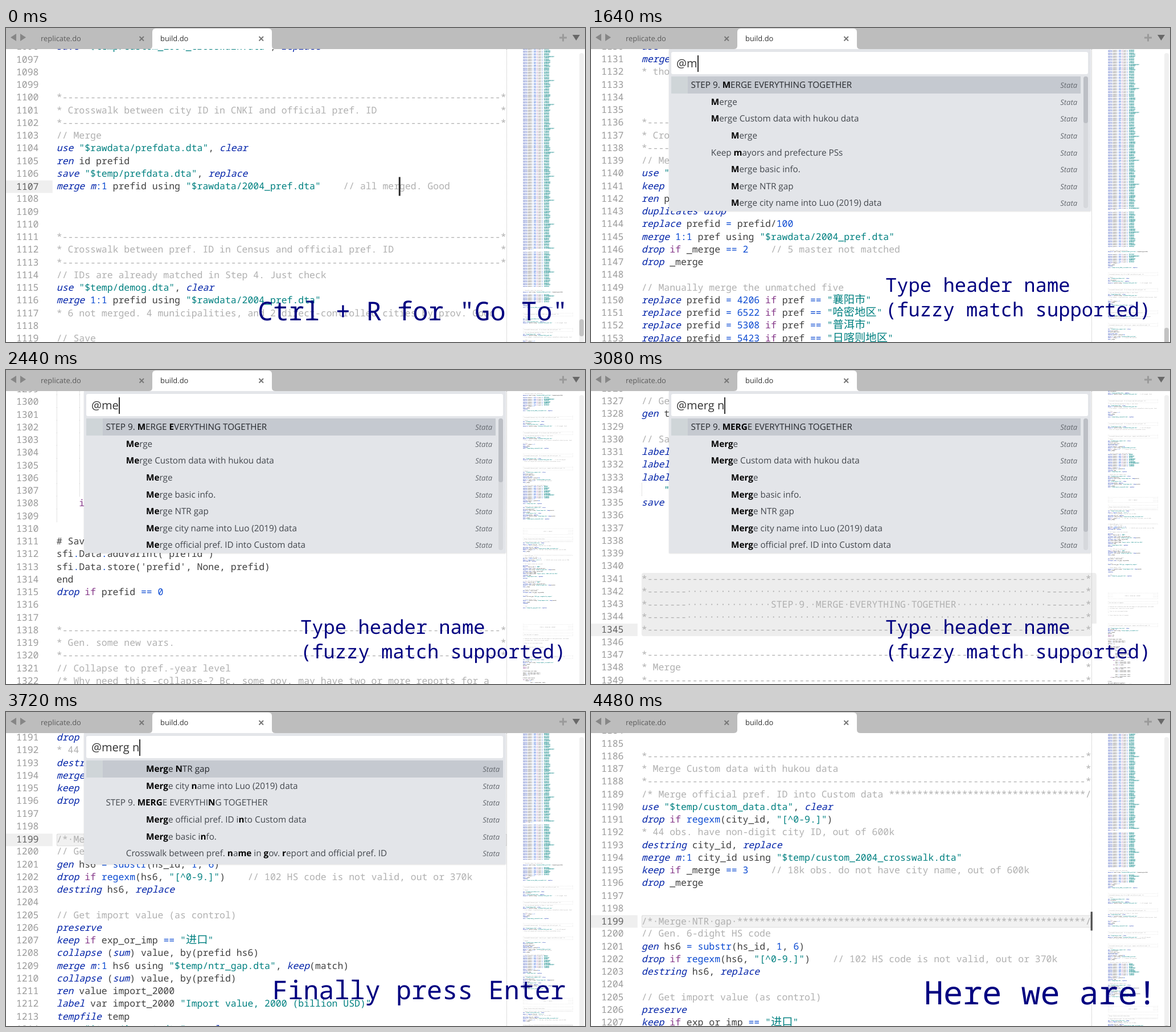
Write an HTML page that moves like this. It is 1017 px wide and 551 px high and loops after 4.96 s.

```html
<!DOCTYPE html>
<html lang="en">
<head>
<meta charset="utf-8">
<title>Go to header</title>
<style>
  html, body { margin: 0; width: 100%; height: 100%; overflow: hidden; background: #fff; }
  body { position: relative; text-rendering: geometricPrecision; font-family: "Open Sans", sans-serif; }
  div, pre, svg { position: absolute; margin: 0; box-sizing: border-box; }
  svg { left: 0; top: 0; width: 1017px; height: 551px; }
  pre, .mono { font: 16.47px/22.25px "Noto Sans Mono", "Noto Sans CJK SC", monospace; white-space: pre; }
  /* Text sits slightly above the middle of its line box. */
  pre { top: -1.5px; }
  .mono { line-height: 19.25px; }
  #view { left: 0; top: 37px; width: 1017px; height: 514px; overflow: hidden; }
  .pane { left: 0; top: -37px; transform-origin: 0 0; color: #404040; }
  #minimap pre { font-weight: 700; }
  #gutter { left: -70.8px; color: #9b9b9b; }
  #current { left: -88.8px; width: 82px; height: 22.25px; padding-left: 18px; background: #efefef; color: #606060; }
  #caret { width: 3px; height: 33px; background: #2b2b2b; }
  .highlight div { position: relative; width: 799px; height: 22.25px; background: #ededed; color: #b0b0b0; }
  .highlight div:first-child { border-radius: 4px 4px 0 0; }
  .highlight div:last-child { width: 791px; border-radius: 0 0 4px 4px; }
  .highlight div:only-child { border-radius: 3px; background: #f1f1f1; box-shadow: inset 0 0 0 1px #d9d9d9; }
  .comment { color: #b0b0b0; }
  .string { color: #008080; }
  .keyword { color: #0022a8; font-style: italic; }
  .flow { color: #86398a; }
  .func, .number { color: #0b4ad2; }
  .han { font-size: 19.3px; line-height: 0; }
  .guide { border-left: 1px dotted #c4c4c4; margin-right: -1px; }
  #ruler { left: 879px; top: 0; height: 514px; border-left: 1px dotted #bdbdbd; }
  #track { left: 1007px; top: 7px; width: 8px; height: 507px; background: #f0f0f0; border-radius: 4px 4px 0 0; }
  #thumb { left: 1007px; width: 8px; height: 30px; background: #c3c3c3; border-radius: 4px; }
  #palette { left: 137px; top: 37px; width: 741px; background: #e3e5e9; box-shadow: 0 1px 2px #0002; }
  #query { left: 4px; top: 5px; width: 732px; height: 39px; padding-left: 9px; background: #fff; border-radius: 3px;
    font-size: 20px; line-height: 40px; color: #333; white-space: pre; }
  #query i { display: inline-block; width: 2px; height: 29px; background: #333; vertical-align: middle; margin-top: -2px; }
  #list { left: 4px; top: 48px; overflow: hidden; }
  .row { position: relative; height: 29.65px; line-height: 30px; font-size: 15.25px; color: #43474d; white-space: pre; }
  .row b { color: #000; }
  .row em { position: absolute; right: 6px; font-size: 13px; color: #666a70; }
  .row.chosen { background: linear-gradient(90deg, #cfd5d8 29px, #c5c9d0 0); color: #25282c; }
  .bar { left: 728px; width: 8px; border-radius: 4px; }
</style>
</head>
<body>
<div id="view">
  <div class="pane" id="editor">
    <pre id="gutter"></pre><div id="current" class="mono"></div>
    <pre class="code"></pre><div class="highlight mono"></div><div id="caret"></div>
  </div>
  <div id="ruler"></div>
  <div class="pane" id="minimap"><pre class="code"></pre><div class="highlight mono"></div></div>
  <div id="track"></div><div id="thumb"></div>
</div>
<svg viewBox="0 0 1017 551" font-size="12.9">
  <path fill="#bdbdbd" d="M0 0H1017V37H0z"/>
  <path fill="#fff" d="M251 37q6 0 6-6V7q0-6 6-6H461q6 0 6 6V31q0 6 6 6z"/>
  <path fill="#868686" d="M18 10V23L8 16.5zM25 10V23L35 16.5z"/>
  <path fill="#686868" d="M995 12H1008L1001.500 22z"/>
  <path stroke="#9a9a9a" stroke-width="3" d="M972 17H985M978.500 10.500V23.500"/>
  <path stroke="#777" stroke-width="2" d="M234.500 15l7.500 7.500m0-7.500l-7.500 7.500M444.500 15l7.500 7.500m0-7.500l-7.500 7.500"/>
  <text x="61" y="23" fill="#5c5c5c">replicate.do</text>
  <text x="271" y="23" fill="#333">build.do</text>
</svg>
<div id="palette">
  <div id="query"></div><div id="list"></div>
  <div class="bar" id="listTrack" style="top:48px;height:231px;background:#d6d8dc"></div>
  <div class="bar" id="listThumb" style="background:#bcbfc5"></div>
</div>
<svg id="caption" viewBox="0 0 1017 551" font-family="'Noto Sans Mono', monospace" fill="#000080"></svg>

<script>
const $ = s => document.querySelector(s), all = s => document.querySelectorAll(s);
const FIRST = 905, LAST = 1352, LINE = 22.25, ROW = 29.65, LOOP = 4960;

// ---- document text, by line number; lines left out are blank ----
const doc = [];
const put = (n, text) => text.split('\n').forEach((line, i) => doc[n + i] = line);
const rule = '*' + '-'.repeat(78) + '*';
const header = (n, title) => put(n, [rule, ('* ' + title).padEnd(79) + '*', rule].join('\n'));
const section = (n, title) => put(n, `/* ${title} `.padEnd(79, '*') + '/');
const banner = (n, title) => {
  const edge = '-'.repeat(7), pad = Math.floor((64 - title.length) / 2);
  const inner = s => '*' + edge + s.padEnd(64) + edge + '*';
  put(n, [rule, inner(''), inner(' '.repeat(pad) + title), inner(''), rule].join('\n'));
};
const cities = '襄阳地区 哈密地区 普洱地区 日喀则地区 昌都地区 林芝地区 铜仁地区 毕节地区 海东地区 吐鲁番地区 山南地区'.split(' ');
const longName = '黔东南苗族自治州';
const recode = (from, to) => {
  for (let n = from; n <= to; n++) {
    const name = n % 17 ? cities[n * n * 7 % 31 % cities.length] : longName;
    put(n, `replace prefid = ${1100 + n * 37 % 5400} if pref == "${name}"`);
  }
};

recode(FIRST, 1081);
put(1055, 'drop if city == ""\n');
put(1084, `// Manually merge the unmatched
merge m:1 pref using "$rawdata/2004_pref.dta", keepusing(prefid)`);
recode(1087, 1092);
put(1093, `drop if _merge == 2
drop _merge
compress
save "$temp/custom_2004_crosswalk.dta", replace`);
header(1100, 'Crosswalk between city ID in CNKI and official pref. ID');
put(1103, `// Merge
use "$rawdata/prefdata.dta", clear
ren id prefid
save "$temp/prefdata.dta", replace
merge m:1 prefid using "$rawdata/2004_pref.dta"    // all merged. Good`);
header(1111, 'Crosswalk between pref. ID in Census and official pref. ID');
put(1114, `// IDs are already matched in Step 4. Just check
use "$temp/demog.dta", clear
merge 1:1 prefid using "$rawdata/2004_pref.dta"
* 6 not merged. 4 municipalities, and 2 direct-controlled cities by prov. Good

// Save
keep if _merge == 3
drop _merge
compress
save "$temp/demog_crosswalk.dta", replace`);
header(1127, 'Crosswalk between pref. ID in mayors and official pref. ID');
put(1130, `use "$temp/mayors.dta", clear
merge m:1 prefid using "$rawdata/2004_pref.dta"    // not all merged
* those not merged are counties and direct-controlled cities`);
header(1136, 'Crosswalk between pref. name in gov. report and official pref. ID');
put(1139, `// Merge
use "$rawdata/gov_report.dta", clear
keep pref prefid
ren pref_name pref
duplicates drop
replace prefid = prefid/100
merge 1:1 pref using "$rawdata/2004_pref.dta"
drop if _merge == 2    // 5 master not matched
drop _merge

// Manually merge the unmatched five
replace prefid = 4206 if pref == "襄阳市"
replace prefid = 6522 if pref == "哈密地区"
replace prefid = 5308 if pref == "普洱市"
replace prefid = 5423 if pref == "日喀则地区"`);
recode(1154, 1158);
put(1159, `drop if prefid == 0
replace prefid = prefid*100
tempfile temp
save "$temp/temp.dta", replace

// Merge into the report data
use "$rawdata/gov_report.dta", clear
ren pref_name pref
merge m:1 pref using "$temp/temp.dta", keep(match)
drop _merge
use "$temp/mayors.dta", clear
destring prefid, replace
merge m:1 prefid using "$temp/temp.dta", keep(match)
drop _merge
save "$temp/report_crosswalk.dta", replace`);
banner(1180, 'STEP 7. IMPORT');
header(1186, 'Merge Custom data with hukou data');
section(1189, 'Merge official pref. ID into Custom data');
put(1190, `use "$temp/custom_data.dta", clear
drop if regexm(city_id, "[^0-9.]")
* 44 obs. have non-digit city ID, out of 600k
destring city_id, replace
merge m:1 city_id using "$temp/custom_2004_crosswalk.dta"
keep if _merge == 3    // 18k obs. do not have city name, out of 600k
drop _merge`);
section(1199, 'Merge NTR gap');
put(1200, `// Gen. 6-dight HS code
gen hs6 = substr(hs_id, 1, 6)
drop if regexm(hs6, "[^0-9.]")    // 102 HS code is not valid, out or 370k
destring hs6, replace

// Get import value (as control)
preserve
keep if exp_or_imp == "进口"
collapse (sum) value, by(prefid hs6)
merge m:1 hs6 using "$temp/ntr_gap.dta", keep(match)
collapse (sum) value, by(prefid)
ren value import_2000
label var import_2000 "Import value, 2000 (billion USD)"
tempfile temp
save "$temp/import.dta", replace
restore

// Gen. NTR gap by prefecture
keep if exp_or_imp == "出口"
collapse (sum) value, by(prefid hs6)
merge m:1 hs6 using "$temp/ntr_gap.dta", keep(match)
drop _merge

// Weight by export value
gen share = value/total
collapse (sum) ntr_gap, by(prefid)

// Label
label var ntr_gap "NTR gap, weighted by export"

// Merge import value
merge 1:1 prefid using "$temp/import.dta", keep(match)
drop _merge
compress

// Save
save "$temp/ntr_gap_pref.dta", replace`);
banner(1248, 'STEP 8. CLEAN GOV. REPORT');
header(1254, 'Get the text of reports');
put(1258, `/* Reports are collected from the web pages of each prefecture, and saved
*  as plain text. Each file is one report.
*
*  Text is cut into words below.
*/

// Start from the list of reports`);
header(1270, 'Crosswalk between pref. name in gov. report and official pref. ID');
put(1273, `use "$temp/report_list.dta", clear
gen prefid = 0
merge m:1 pref using "$temp/report_crosswalk.dta"
drop _merge
python:
import sfi
import re

# Read names and codes
names = sfi.Data.get('pref')
codes = sfi.Data.get('code')
prefid = []

# Match each report
for name in names:
    found = 0
    best = None`);
for (let n = 1289; n < 1308; n++)
  put(n, n % 5 ? `        ${n % 3 ? '    best = score(name, code)' : 'for code in codes:'}` : '        ');
put(1308, `    if best is not None:
    

# Save
sfi.Data.addVarInt('prefid')
sfi.Data.store('prefid', None, prefid)
end
drop if prefid == 0`);
header(1318, 'Gen. some new vars.');
put(1321, `// Collapse to pref.-year level
/* Why need this -collapse-? Bc. some gov. may have two or more reports for a
*  year, so the mean is kept */
collapse (mean) score, by(prefid year)`);
put(1327, `// Gen. total
gen total = score*100

// Save
label var score "Score of report"
label var total "Total score"
label var year
    "Year of report"
save "$temp/report.dta", replace`);
banner(1341, 'STEP 9. MERGE EVERYTHING TOGETHER');
header(1347, 'Merge');

// ---- syntax colours ----
const syntax = new RegExp([
  '(?<guide>(?<=^(?: {4})*) {4})',
  '(?<comment>^\\s*(?:\\*|//|/\\*).*|//.*)',
  '(?<string>"[^"]*")',
  '(?<keyword>\\b(?:use|clear|ren|save|replace|merge|drop|keep|gen|destring|preserve|restore|collapse|sum|mean|label|tempfile|duplicates|compress)\\b|\\bm(?=:1))',
  '(?<flow>\\b(?:if|for|in|import)\\b)',
  '(?<func>\\b(?:regexm|substr)\\b)',
  '(?<number>\\b\\d+\\b|[=:.]+)'].join('|'), 'g');
const paint = line => line.replace(syntax, (text, ...rest) => {
  const groups = rest.at(-1), kind = Object.keys(groups).find(k => groups[k] !== undefined);
  const inner = text.replace(/[\u3400-\u9fff]+/g, '<span class="han">$&</span>');
  return `<span class="${kind}">${inner}</span>`;
});
const numbers = Array.from({ length: LAST - FIRST + 1 }, (_, i) => FIRST + i);
const codeHtml = numbers.map(n => paint(doc[n] || '')).join('\n');
all('.code').forEach(el => el.innerHTML = codeHtml);
$('#gutter').textContent = numbers.join('\n');

// ---- palette lists: each entry is its depth and its title ----
const outline = `2Merge basic info.
0STEP 6. CROSSWALK
1Download hukou data from Luo (2019)
1Crosswalk between city ID in Luo (2019) and official pref. ID
2Merge city name into Luo (2019) data
1Crosswalk between city ID in Custom data and official pref. ID
2Clean city name in Custom data
1Crosswalk between city ID in CNKI and official pref. ID`.split('\n');
const merges = `0STEP 9. MERGE EVERYTHING TOGETHER
1Merge
1Merge Custom data with hukou data
2Merge
1Keep mayors and prefecture PSs
2Merge basic info.
2Merge NTR gap
2Merge city name into Luo (2019) data
2Merge official pref. ID into Custom data`.split('\n');
const narrowed = `2<b>Merg</b>e <b>N</b>TR gap
2<b>Merg</b>e city <b>n</b>ame into Luo (2019) data
0STEP 9. <b>MERG</b>E EVERYTHI<b>N</b>G TOGETHER
2<b>Merg</b>e official pref. ID i<b>n</b>to Custom data
2<b>Merg</b>e basic i<b>n</b>fo.
1Crosswalk between pref. <b>n</b>a<b>me</b> in <b>g</b>ov. <b>r</b>eport and official pref. ID`.split('\n');
const matching = word => merges.filter(t => word === 'm' || !t.includes('Keep')).slice(0, 8).map(t =>
  word === 'me' && t[0] === '0' ? t.replace('ME', '<b>M</b>E').replace(' E', ' <b>E</b>')
    : t.replace(new RegExp(word, 'i'), '<b>$&</b>'));

const lists = {
  all: { items: outline, chosen: 7, bar: [187, 39] },
  m: { items: matching('m'), chosen: 0, bar: [85, 82] },
  me: { items: matching('me'), chosen: 0, bar: [85, 112] },
  mer: { items: matching('mer'), chosen: 0, bar: [85, 150] },
  merg: { items: matching('merg'), chosen: 0, bar: [85, 199] },
  n: { items: narrowed, chosen: 0 }
};

// ---- captions: size, x, then [baseline, text] ----
const captions = {
  open: [45.4, 442, [513, 'Ctrl + R for "Go To"']],
  type: [33.8, 517, [463, 'Type header name'], [506, '(fuzzy match supported)']],
  enter: [45.2, 468, [504, 'Finally press Enter']],
  done: [56.8, 585, [513, 'Here we are!']]
};

// ---- timeline: start, top line, caption, selected lines, query, list ----
const city = [1100, 1102], step = [1341, 1345], gap = [1199, 1199];
const timeline = [
  [0, 1097, 'open', null],
  [560, 1097, 'open', city, '@', 'all'],
  [1640, 1131, 'type', step, '@m', 'm'],
  [2160, 1172, 'type', step, '@m', 'm'],
  [2280, 1243, 'type', step, '@me', 'me'],
  [2440, 1299.95, 'type', step, '@me', 'me'],
  [2600, 1316, 'type', step, '@mer', 'mer'],
  [2720, 1322.5, 'type', step, '@mer', 'mer'],
  [2880, 1325.6, 'type', step, '@merg', 'merg'],
  [2980, 1326.6, 'type', step, '@merg ', 'merg'],
  [3080, 1327, 'type', step, '@merg n', 'merg'],
  [3200, 1308, 'type', gap, '@merg n', 'n'],
  [3360, 1262, 'enter', gap, '@merg n', 'n'],
  [3600, 1211, 'enter', gap, '@merg n', 'n'],
  [3720, 1191.43, 'enter', gap, '@merg n', 'n'],
  [4000, 1185, 'enter', gap, '@merg n', 'n'],
  [4480, 1185, 'done', gap]
];

const lineTop = n => (n - FIRST) * LINE + 'px';

function showPalette(query, list) {
  $('#palette').style.display = list ? '' : 'none';
  if (!list) return;
  const { items, chosen, bar } = lists[list];
  const height = Math.min(231, items.length * ROW);
  $('#palette').style.height = height + 52.5 + 'px';
  $('#query').innerHTML = query + '<i></i>';
  $('#list').style.cssText = `height:${height}px;width:${bar ? 719 : 732}px`;
  $('#list').innerHTML = items.map((item, i) =>
    `<div class="row${i === chosen ? ' chosen' : ''}" style="padding-left:${34.5 + item[0] * 35.3}px">` +
    `${item.slice(1)}<em>Stata</em></div>`).join('');
  $('#list').scrollTop = chosen ? 999 : 0;
  $('#listTrack').style.display = $('#listThumb').style.display = bar ? '' : 'none';
  if (bar) {
    $('#listThumb').style.top = bar[0] - 37 + 'px';
    $('#listThumb').style.height = bar[1] + 'px';
  }
}

function show([, top, caption, selected, query, list]) {
  $('#editor').style.transform = `translate(88.8px, ${44.5 - (top - FIRST) * LINE}px)`;
  const mapTop = 499 - 2.065 * (top - 1097) - (1100 - FIRST) * LINE / 9;
  $('#minimap').style.transform = `translate(908px, ${mapTop}px) scale(${1 / 9})`;
  $('#thumb').style.top = 474 + 0.44 * (top - 1097) + 'px';

  const line = selected ? selected[1] : 1107;
  $('#current').textContent = line;
  $('#current').style.top = lineTop(line);
  $('#caret').style.cssText =
    `left:${selected ? 788.5 : 600.5}px;top:calc(${lineTop(line)} - 5.5px);display:${list ? 'none' : 'block'}`;
  const rows = selected ? doc.slice(selected[0], selected[1] + 1) : [];
  all('.highlight').forEach(el => {
    el.style.top = lineTop(selected ? selected[0] : FIRST);
    el.innerHTML = rows.map(row => `<div>${row.replace(/ /g, '·')}</div>`).join('');
  });

  showPalette(query, list);
  const [size, x, ...texts] = captions[caption];
  $('#caption').innerHTML = texts.map(([y, text]) =>
    `<text x="${x}" y="${y}" font-size="${size}">${text}</text>`).join('');
}

let shown;
function tick() {
  const time = performance.now() % LOOP;
  const state = timeline.findLast(entry => entry[0] <= time);
  if (state !== shown) show(shown = state);
  requestAnimationFrame(tick);
}
tick();
</script>
</body>
</html>
```
